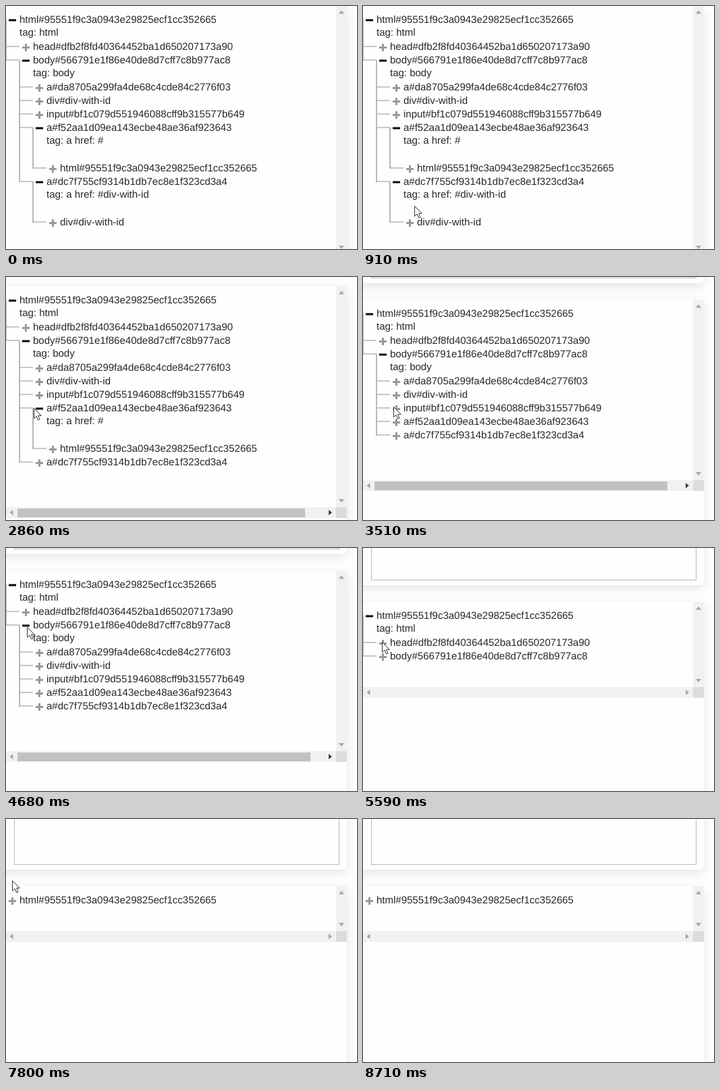
Recreate the animation shown at these times as an HTML page. Size 520 by 360 pixels, loop 8.84 s.

```html
<!DOCTYPE html>
<html lang="en">
<head>
<meta charset="utf-8">
<title>Collapsible element tree</title>
<style>
  html, body { margin: 0; width: 100%; height: 100%; overflow: hidden; background: #fefefe; }
  #stage { position: relative; width: 520px; height: 360px; overflow: hidden; }
  .scene { position: absolute; left: 0; width: 520px; visibility: hidden; }
  .card { position: absolute; left: -30px; width: 535px; background: #fefefe; box-shadow: 0 5px 16px rgba(0, 0, 0, .1); }
  .upper { top: -225px; height: 200px; border-radius: 6px; }
  .lower { top: 0; height: 420px; }
  .field { position: absolute; left: 12px; top: -216px; width: 480px; height: 182px; border: 1px solid #b9b9b9; }
  svg { position: absolute; left: 0; top: 0; overflow: visible; }
  text { font: 15px "Liberation Sans", Arial, sans-serif; fill: #282828; text-rendering: geometricPrecision; }
  .twig { stroke: #c8c8c8; stroke-width: 2; }
  .trunk { stroke: #b8b8b8; stroke-width: 2; }
  .plus { stroke: #999; stroke-width: 3; }
  .minus { stroke: #080808; stroke-width: 3; }
</style>
</head>
<body>
<div id="stage">
  <svg id="cursor" width="14" height="20">
    <path d="M.5 .5V15.5L4 12.2L6.5 18L9 17L6.5 11.3H11.2Z" fill="#fff" stroke="#333" stroke-width="1"/>
  </svg>
</div>
<script>
const TICK = 130, LOOP = 8840;
const stage = document.getElementById('stage');
const cursor = document.getElementById('cursor');
const node = (key, label, tag, kids = [], gap = 40) => ({ key, label, tag, kids, gap });

const rootLabel = 'html#95551f9c3a0943e29825ecf1cc352665';
const tree = node('html', rootLabel, 'html', [
  node('head', 'head#dfb2f8fd40364452ba1d650207173a90', 'head', [
    node('title', 'title#0e00918969324688ab9d6edb809bf71d', 'title')
  ]),
  node('body', 'body#566791e1f86e40de8d7cff7c8b977ac8', 'body', [
    node('a1', 'a#da8705a299fa4de68c4cde84c2776f03', 'a'),
    node('div', 'div#div-with-id', 'div'),
    node('input', 'input#bf1c079d551946088cff9b315577b649', 'input'),
    node('a2', 'a#f52aa1d09ea143ecbe48ae36af923643', 'a href: #', [node('up', rootLabel, 'html')], 60),
    node('a3', 'a#dc7f755cf9314b1db7ec8e1f323cd3a4', 'a href: #div-with-id', [node('down', 'div#div-with-id', 'div')], 60)
  ])
]);

// thumb: right end of the horizontal scroll thumb, 0 when there is nothing to scroll
const scenes = [
  { at: 0, top: 0, bottom: 383, thumb: 443, open: ['html', 'body', 'a2', 'a3'] },
  { at: 1950, top: 14, bottom: 357, thumb: 443, open: ['html', 'body', 'a2'] },
  { at: 3510, top: 34, bottom: 317, thumb: 451, open: ['html', 'body'] },
  { at: 4940, top: 80, bottom: 222, thumb: 0, open: ['html'] },
  { at: 6110, top: 67, bottom: 249, thumb: 451, open: ['html', 'head'] },
  { at: 7800, top: 100, bottom: 182, thumb: 0, open: [] }
];

// time, x, y of the pointer tip
const path = [
  [260, 139, 345], [1040, 71, 292], [1690, 49, 264], [2210, 49, 264],
  [2860, 41, 194], [3250, 45, 192], [3640, 45, 192], [4290, 33, 121],
  [4420, 33, 121], [4680, 31, 117], [5070, 31, 117], [5590, 28, 139],
  [6500, 28, 139], [7020, 15, 93], [7540, 9, 91], [7930, 9, 91], [8580, 40, 322]
];

const rect = (x, y, w, h, fill) => `<rect x="${x}" y="${y}" width="${w}" height="${h}" fill="${fill}"/>`;
const line = (cls, d) => `<path class="${cls}" d="${d}"/>`;
const label = (x, y, text) => `<text x="${x}" y="${y}">${text}</text>`;
const arrow = (x, y, turn, fill) =>
  `<path d="M-4 2.5H4L0 -2.5Z" fill="${fill}" transform="translate(${x} ${y}) rotate(${turn})"/>`;

function drawTree(open) {
  let branches = '', items = '';
  function place(n, depth, y) {
    const x = depth * 20, isOpen = open.includes(n.key);
    items += isOpen
      ? line('minus', `M${x + 4} ${y + 1}h11`)
      : line('plus', `M${x + 4} ${y + 1.5}h11m-5.5 -5.5v11`);
    items += label(x + 20, y + 5, n.label);
    if (!isOpen) return y + 20;
    items += label(x + 20, y + 24, 'tag: ' + n.tag);
    let next = y + n.gap, last = next;
    for (const kid of n.kids) {
      last = next;
      branches += line('twig', `M${x} ${last}h20`);
      next = place(kid, depth + 1, last);
    }
    branches += line('trunk', `M${x} ${y}V${last + 1}`);
    return next;
  }
  place(tree, 0, 20);
  return branches + items;
}

function drawBars({ top, bottom, thumb }) {
  const y = bottom - top - 16, mid = y + 8, pale = '#a5a5a5';
  return rect(489, 0, 16, y, '#f1f1f1') + rect(0, y, 489, 16, '#f1f1f1') +
    rect(489, y, 16, 16, '#dcdcdc') +
    (thumb ? rect(17, y + 2, thumb - 17, 13, '#c1c1c1') : '') +
    arrow(497, 9, 0, pale) + arrow(497, y - 9.5, 180, pale) +
    arrow(8, mid, -90, pale) + arrow(480.5, mid, 90, thumb ? '#404040' : pale);
}

for (const scene of scenes) {
  const el = scene.el = document.createElement('div');
  el.className = 'scene';
  el.style.top = scene.top + 'px';
  el.innerHTML = `<div class="card upper"></div><div class="field"></div><div class="card lower"></div>
    <svg width="520" height="400">${drawTree(scene.open)}${drawBars(scene)}</svg>`;
  stage.insertBefore(el, cursor);
}

function pointerAt(t) {
  const i = path.findIndex(p => p[0] >= t);
  if (i < 0 || t < path[0][0]) return null;
  if (i === 0) return path[0].slice(1);
  const [t0, x0, y0] = path[i - 1], [t1, x1, y1] = path[i];
  const k = (t - t0) / (t1 - t0), ease = k * k * (3 - 2 * k);
  return [x0 + (x1 - x0) * ease, y0 + (y1 - y0) * ease];
}

function render(now) {
  const t = Math.floor(now % LOOP / TICK) * TICK;
  const current = scenes.findLast(s => s.at <= t);
  for (const s of scenes) s.el.style.visibility = s === current ? 'visible' : 'hidden';
  const tip = pointerAt(t);
  cursor.style.visibility = tip ? 'visible' : 'hidden';
  if (tip) cursor.style.transform = `translate(${Math.round(tip[0])}px, ${Math.round(tip[1])}px)`;
}

const start = performance.now();
function loop() {
  render(performance.now() - start);
  requestAnimationFrame(loop);
}
loop();
</script>
</body>
</html>
```
